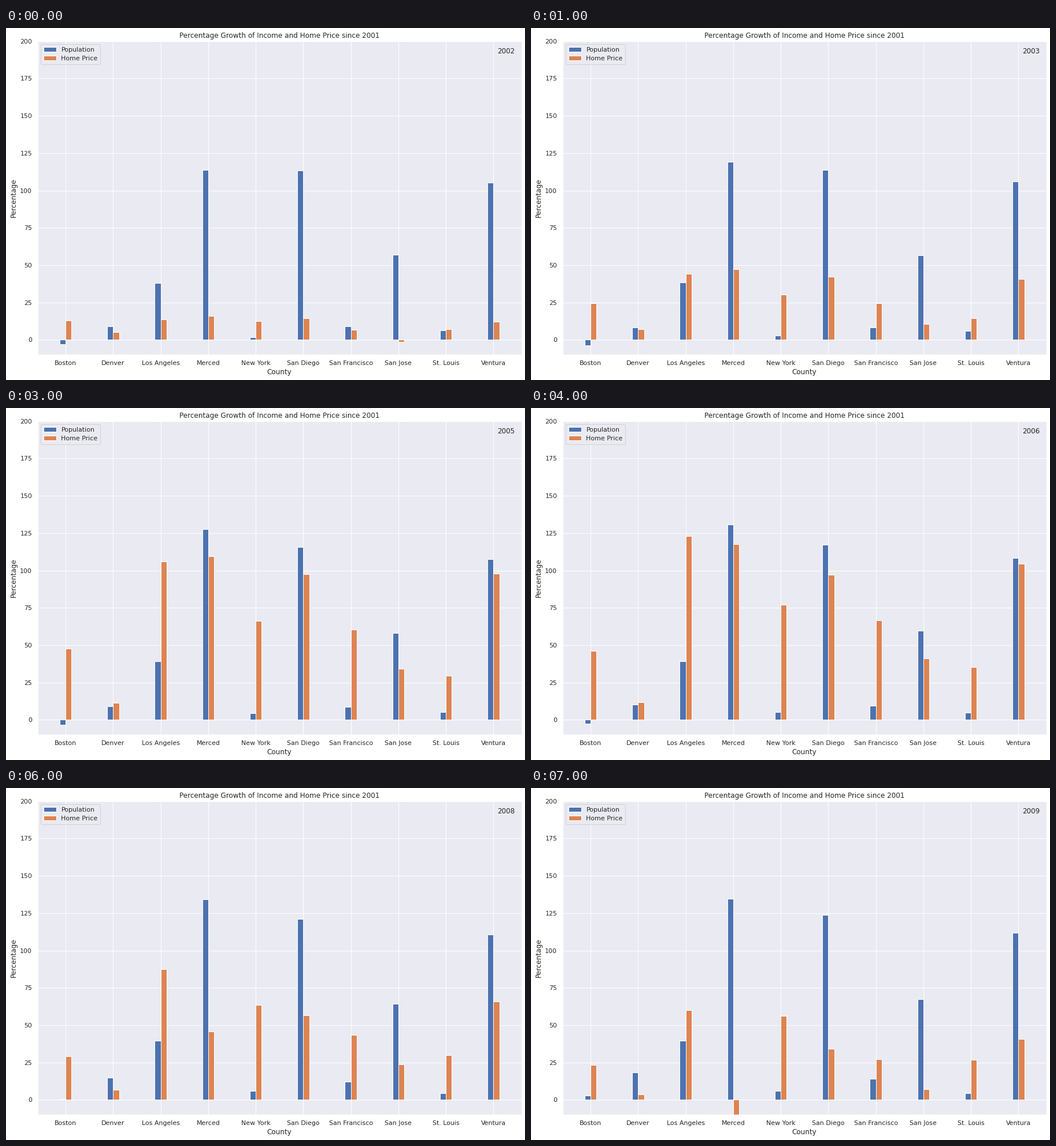
Recreate the animation shown at these times as a matplotlib script. Size 898 px wide and 610 px high, loop 8 s.

```python
import matplotlib.pyplot as plt
import numpy as np
from matplotlib.animation import FuncAnimation

W, H, DPI = 898, 610, 72
INK, PANEL = "0.15", "#EAEAF2"
BLUE, ORANGE = "#4C72B0", "#DD8452"
BAR = 0.125
YEARS = range(2002, 2010)

# Key points per city: population in POP_KEYS, then home price in PRICE_KEYS
POP_KEYS = [2002, 2005, 2009]
PRICE_KEYS = [2002, 2005, 2007, 2009]
CITIES = {
    "Boston": ([-3.1, -3.2, 2.8], [12.8, 47.6, 39.1, 23.3]),
    "Denver": ([9, 9, 18.3], [5.1, 11.2, 10.9, 3.6]),
    "Los Angeles": ([38, 39, 39.6], [13.6, 106, 126, 60]),
    "Merced": ([113.7, 127.6, 134.6], [16, 109.5, 112.6, -15]),
    "New York": ([1.7, 4.4, 6], [12.5, 66.2, 79, 56.2]),
    "San Diego": ([113.3, 115.7, 123.8], [14.4, 97.5, 86, 34]),
    "San Francisco": ([9, 8.6, 14], [6.7, 60.4, 65.5, 27.2]),
    "San Jose": ([57, 58, 67.4], [-1.2, 34, 43.3, 7.1]),
    "St. Louis": ([6.2, 5.1, 4.4], [7, 29.5, 36.8, 26.8]),
    "Ventura": ([105.3, 107.5, 111.8], [12, 98, 99, 40.8]),
}

plt.rcParams.update({
    "font.family": "DejaVu Sans", "font.size": 12,
    "text.color": INK, "axes.labelcolor": INK,
    "xtick.color": INK, "ytick.color": INK,
})


def population(keys, year):
    """Smooth drift: the parabola through the three key points."""
    start = POP_KEYS[0]
    curve = np.polyfit(np.subtract(POP_KEYS, start), keys, 2)
    return np.polyval(curve, year - start)


def home_price(keys, year):
    """Straight runs between key points, swelling at the 2006 peak."""
    value = np.interp(year, PRICE_KEYS, keys)
    if year in PRICE_KEYS:
        return value
    return value * (1 + 0.06 * np.cos(np.pi * (year - 2006) / 2))


fig = plt.figure(figsize=(W / DPI, H / DPI), dpi=DPI, facecolor="white")
ax = fig.add_axes([54.75 / W, 43.68 / H, 837 / W, 543.6 / H], facecolor=PANEL)
ax.set_axisbelow(True)
ax.grid(color="white", linewidth=1)
for spine in ax.spines.values():
    spine.set(color="white", linewidth=1.25)


def add_bars(shift, color, label):
    x = np.arange(len(CITIES)) + shift
    return ax.bar(x, np.zeros(len(x)), width=BAR, color=color, label=label,
                  edgecolor="white", linewidth=1)


pop_bars = add_bars(-BAR / 2, BLUE, "Population")
price_bars = add_bars(BAR / 2, ORANGE, "Home Price")

ax.set_xlim(-0.5875, 9.5875)
ax.set_ylim(-10, 200)
ax.set_xticks(range(len(CITIES)), CITIES)
ax.set_yticks(range(0, 201, 25))
# Hidden ticks still keep their room beside the labels
ax.tick_params(length=6, pad=3.5, labelsize=11, bottom=False, left=False)
ax.set_title("Percentage Growth of Income and Home Price since 2001",
             fontsize=12, pad=6)
ax.set_xlabel("County", fontsize=12, labelpad=4)
ax.set_ylabel("Percentage", fontsize=12, labelpad=4)
ax.legend(loc="upper left", fontsize=11, framealpha=0.8,
          facecolor=PANEL, edgecolor="0.8")
year_text = ax.text(0.95, 0.96, "", transform=ax.transAxes, fontsize=12)


def update(i):
    year = YEARS[i]
    rows = zip(CITIES.values(), pop_bars, price_bars)
    for (pop_keys, price_keys), pop_bar, price_bar in rows:
        pop_bar.set_height(population(pop_keys, year))
        price_bar.set_height(home_price(price_keys, year))
    year_text.set_text(str(year))
    return [year_text]


anim = FuncAnimation(fig, update, frames=len(YEARS), interval=1000,
                     repeat=True, repeat_delay=0, blit=False)
plt.show()
```
